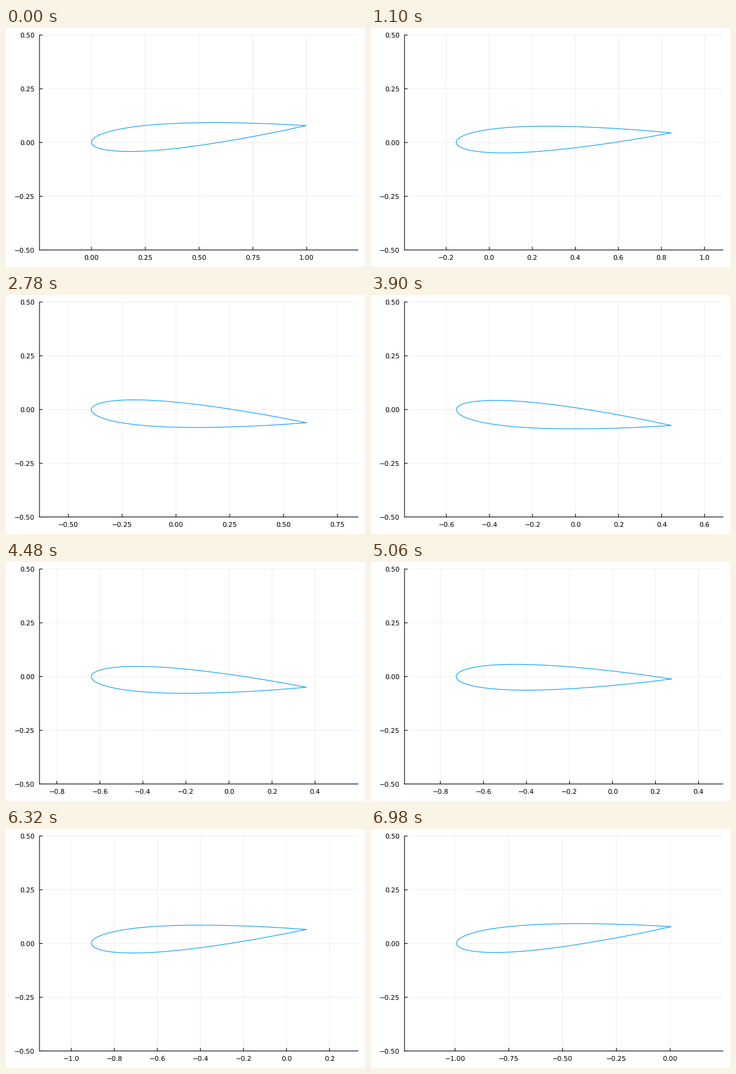
Write a matplotlib script that moves like this. It is 600 px wide and 400 px high and loops after 7080 ms.

```python
import math

import numpy as np
import matplotlib.pyplot as plt
from matplotlib.animation import FuncAnimation
from matplotlib.collections import LineCollection

plt.rcParams["font.family"] = "DejaVu Sans"
plt.rcParams["text.hinting"] = "none"

STEP_MS, LOOP_MS = 20, 7080
POSES = 150
LEFT, RIGHT, TOP, BOTTOM = 56.0, 588.2, 11.8, 371.5
SCALE = BOTTOM - TOP            # pixels per unit on both axes
MID_X, MID_Y = (LEFT + RIGHT) / 2, (TOP + BOTTOM) / 2
HALF = (RIGHT - LEFT) / 2 / SCALE
TICK = 5.2
PITCH = math.pi / 40
PX = 0.72                       # points per pixel at 100 dpi

fig = plt.figure(figsize=(6, 4), dpi=100, facecolor="white")
ax = fig.add_axes([0, 0, 1, 1])
ax.set_xlim(0, 600)
ax.set_ylim(400, 0)
ax.axis("off")


def lines(segs, width, **style):
    coll = LineCollection(segs, linewidths=width * PX, **style)
    coll.set_snap(False)
    return ax.add_collection(coll, autolim=False)


def label(v, digits):
    return f"{v:.{digits}f}".replace("-", "\u2212")


def foil_shape():
    """Symmetric 12 % section, leading edge at the origin."""
    s = np.linspace(-1, 1, 41)
    a = np.abs(s)
    half = 0.6 * (0.2969 * a - 0.126 * a**2 - 0.3516 * a**4
                  + 0.2843 * a**6 - 0.1036 * a**8)
    return s**2, np.sign(s) * half


def x_ticks(lo, hi):
    """Prefer 5 quarter ticks, then 7 fifth ticks, else quarters."""
    def fit(step):
        return [n * step for n in range(math.ceil(lo / step),
                                        math.floor(hi / step) + 1)]
    quarters, fifths = fit(0.25), fit(0.2)
    if len(quarters) != 5 and len(fifths) == 7:
        return fifths, 1
    return quarters, 2


def pose_at(ms):
    """Poses last 20, 100 and 20 ms in turn; the last one is held."""
    m, r = divmod(ms, 140)
    return min(3 * m + (r >= 20) + (r >= 120), POSES - 1)


y_vals = [0.5, 0.25, 0.0, -0.25, -0.5]
y_pix = [MID_Y - v * SCALE for v in y_vals]
GRID = dict(colors="black", alpha=0.07, zorder=1)
AXIS = dict(colors="black", zorder=3)

lines([[(LEFT, y), (RIGHT, y)] for y in y_pix], 1, **GRID)
lines([[(LEFT, y), (LEFT + TICK, y)] for y in y_pix], 1.1, **AXIS)
lines([[(LEFT, TOP), (LEFT, BOTTOM)], [(LEFT, BOTTOM), (RIGHT, BOTTOM)]],
      1.1, capstyle="projecting", **AXIS)
for v, y in zip(y_vals, y_pix):
    ax.text(47.8, y + 4.1, label(v, 2), size=8, ha="right", va="baseline")

x_grid = lines([], 1, **GRID)
x_marks = lines([], 1.1, **AXIS)
x_labels = [ax.text(0, 387.6, "", size=8, ha="center", va="baseline")
            for _ in range(8)]
foil, = ax.plot([], [], color="#009AFA", lw=1.1 * PX, zorder=4,
                solid_joinstyle="miter", snap=False)
fx, fy = foil_shape()


def update(i):
    phase = pose_at(i * STEP_MS) / POSES
    theta = PITCH * math.cos(2 * math.pi * phase)
    c, s = math.cos(theta), math.sin(theta)
    centre = c / 2 - phase

    def to_px(x):
        return MID_X + (x - centre) * SCALE

    foil.set_data(to_px(fx * c - fy * s - phase),
                  MID_Y - (fx * s + fy * c) * SCALE)

    ticks, digits = x_ticks(centre - HALF, centre + HALF)
    xs = [to_px(v) for v in ticks]
    x_grid.set_segments([[(x, TOP), (x, BOTTOM)] for x in xs])
    x_marks.set_segments([[(x, BOTTOM), (x, BOTTOM - TICK)] for x in xs])
    for n, text in enumerate(x_labels):
        text.set_visible(n < len(ticks))
        if n < len(ticks):
            text.set_x(xs[n])
            text.set_text(label(ticks[n], digits))
    return [foil, x_grid, x_marks, *x_labels]


anim = FuncAnimation(fig, update, frames=LOOP_MS // STEP_MS,
                     interval=STEP_MS, repeat=True, repeat_delay=0)
plt.show()
```
